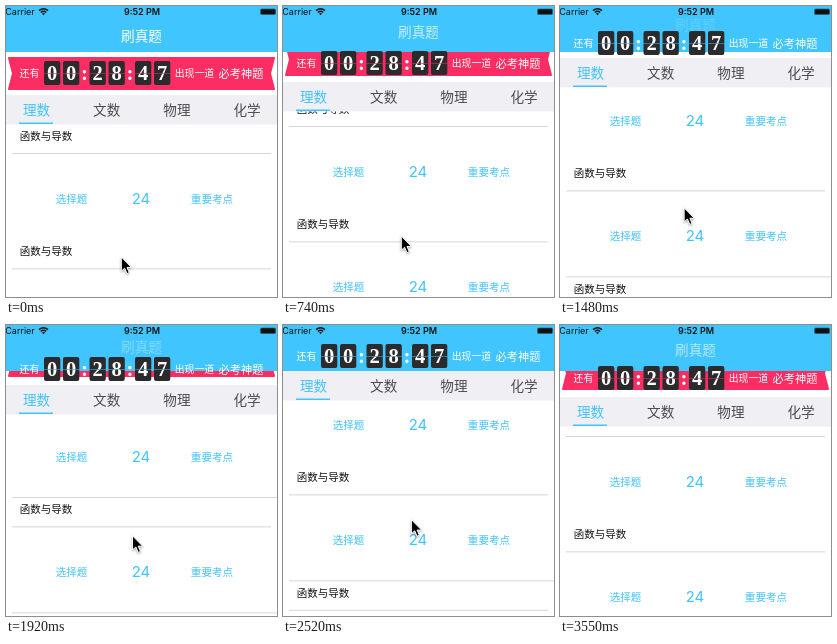
Animation of 271x291 px, one loop 4000 ms. Source, as an HTML page:

```html
<!DOCTYPE html>
<html lang="zh-CN">
<head>
<meta charset="utf-8">
<title>刷真题</title>
<style>
  html, body { margin: 0; width: 100%; height: 100%; overflow: hidden; background: #fff; }
  svg { display: block; width: 271px; height: 291px; }
  text { font-family: "Noto Sans CJK SC", "Noto Sans CJK", sans-serif; text-anchor: middle; }
  .latin { font-family: Inter, sans-serif; }
  .flip { font-family: "Liberation Serif", serif; font-weight: 700; }
</style>
</head>
<body>
<svg id="stage" viewBox="0 0 271 291">
  <defs>
    <clipPath id="halves">
      <rect x="30" y="50" width="140" height="17"/>
      <rect x="30" y="67.5" width="140" height="20"/>
    </clipPath>
  </defs>
  <rect width="271" height="291" fill="#fff"/>
  <g id="list"></g>
  <g id="tabs">
    <rect y="46" width="271" height="43" fill="#fff"/>
    <rect y="89" width="271" height="29.5" fill="#efeff4"/>
    <rect x="13" y="116.5" width="34" height="1.5" fill="#41c3fb"/>
  </g>
  <path id="ribbon" d="M3 52L7 67.5L3 83H268L264 67.5L268 52Z" fill="#fb2d62"
    stroke="#fb2d62" stroke-width="2" stroke-linejoin="round"/>
  <rect width="271" height="46" fill="#41c5ff"/>
  <g id="title"></g>
  <g id="banner"><g id="clock" clip-path="url(#halves)"></g></g>
  <g id="status">
    <g fill="none" stroke="#111" stroke-width="1.4">
      <path d="M33 4.6Q37.5 .8 42 4.6"/>
      <path d="M34.8 6.5Q37.5 4.2 40.2 6.5"/>
    </g>
    <path d="M36 7.6Q37.5 6.6 39 7.6L37.5 9.2Z" fill="#111"/>
    <rect x="254" y="2.5" width="16" height="6.5" rx="1.5" fill="#111" opacity=".4"/>
    <rect x="254.8" y="3.2" width="14.5" height="5.1" rx="1" fill="#111"/>
  </g>
  <path id="cursor" d="M0 0V14.2L3.3 11.2L5.7 16.6L8 15.6L5.7 10.4H10.2Z"
    fill="#000" stroke="#fff" stroke-width="1" stroke-linejoin="round"
    style="filter:drop-shadow(0 1px 1px rgba(0,0,0,.35))"/>
</svg>
<script>
const $ = id => document.getElementById(id);
const BLUE = '#41c3fb';

function add(parent, tag, attrs) {
  const el = document.createElementNS('http://www.w3.org/2000/svg', tag);
  for (const key in attrs) el.setAttribute(key, attrs[key]);
  return parent.appendChild(el);
}

// Text centred on (x, y)
function label(parent, str, x, y, size, fill, cls = '') {
  const drop = cls ? 0.36 : 0.38;
  const el = add(parent, 'text', { x, y: y + size * drop, 'font-size': size, fill, class: cls });
  el.textContent = str;
  return el;
}

function rule(y, width) {
  return add($('list'), 'rect', { x: 6, y, width, height: 1, fill: '#d6d6d8' });
}

const dividers = [];
for (let i = 0; i < 3; i++) {
  const top = i * 115.4, y = Math.round(top);
  if (i) dividers.push(rule(top + 117.6, 265));
  label($('list'), '函数与导数', 40, y + 130, 10.5, '#111');
  rule(top + 147, 259);
  label($('list'), '选择题', 65.5, y + 193, 10.5, BLUE);
  label($('list'), '24', 135, y + 193, 15, BLUE, 'latin');
  label($('list'), '重要考点', 206, y + 193, 10.6, BLUE);
}

['理数', '文数', '物理', '化学'].forEach((name, i) =>
  label($('tabs'), name, 30.5 + i * 70.2, 104, 13.6, i ? '#4c4c4e' : BLUE));

label($('title'), '刷真题', 135.5, 30, 13.6, '#fff');

label($('banner'), '还有', 23.5, 67.5, 9.9, '#fff');
label($('banner'), '出现一道', 188.5, 67.5, 9.9, '#fff');
label($('banner'), '必考神题', 235, 67.5, 11.2, '#fff');

[...'002847'].forEach((digit, i) => {
  const pair = Math.floor(i / 2), x = 38 + pair * 45.5 + (i % 2) * 19;
  add($('clock'), 'rect', { x, y: 55, width: 16.3, height: 24, rx: 2, fill: '#2b2b2d' });
  label($('clock'), digit, x + 8.2, 66.7, 20.5, '#fff', 'flip');
  if (i % 2 && pair < 2) label($('banner'), ':', x + 21.5, 66, 21, '#fff', 'flip');
});

label($('status'), 'Carrier', 14, 5.8, 9, '#111', 'latin');
label($('status'), '9:52 PM', 136, 5.8, 9, '#111', 'latin').setAttribute('font-weight', 600);

const LOOP = 4000, BEAT = LOOP / 27;
const clamp = u => Math.min(1, Math.max(0, u));
const easeOut = u => u * (2 - u);
const snap = u => u ** 3 / (u ** 3 + (1 - u) ** 3);
const mix = (a, b, u) => a + (b - a) * u;

// Turning points of the drags: [beat, scroll]
const drags = [[0, 0], [3, 0], [4, 8], [5, 27], [8, 58], [9, 79],
  [12, 78], [13, 61], [15, 56], [17, 93], [20, 36], [27, 36]];

function scrollAt(beat) {
  const i = drags.findIndex(([end]) => end > beat);
  const [from, a] = drags[i - 1], [to, b] = drags[i];
  return mix(a, b, easeOut((beat - from) / (to - from)));
}

const move = (id, x, y) => $(id).setAttribute('transform', `translate(${x} ${y})`);
const lift = (id, amount) => move(id, 0, -Math.round(amount));

function draw(t) {
  // The picture advances in beats, each starting on a 10 ms tick
  const beat = Math.min(26, Math.floor((t + 9) / BEAT));
  const scroll = scrollAt(beat);
  lift('list', scroll);
  lift('ribbon', scroll * 0.53);
  lift('tabs', Math.min(43, scroll * 0.475));
  lift('banner', scroll * 0.385);
  lift('title', scroll * 0.137);
  $('title').setAttribute('opacity', clamp(1 - scroll / 93));
  // The hairline above the second row only shows mid-scroll
  dividers[0].setAttribute('opacity', scroll > 50 && scroll < 70 ? 1 : 0);

  // The pointer follows the drag, then leaves to the lower right
  const x = 115.3 + 13.5 * easeOut(clamp((beat - 3) / 17));
  const y = 251 - 1.5 * scroll ** 0.8;
  const exit = snap(clamp((beat - 20) / 3));
  move('cursor', mix(x, 212.5, exit), mix(y, 284, exit));
  $('cursor').setAttribute('visibility', beat < 24 ? 'visible' : 'hidden');
}

const start = performance.now();
function tick() {
  draw((performance.now() - start) % LOOP);
  requestAnimationFrame(tick);
}
tick();
</script>
</body>
</html>
```
